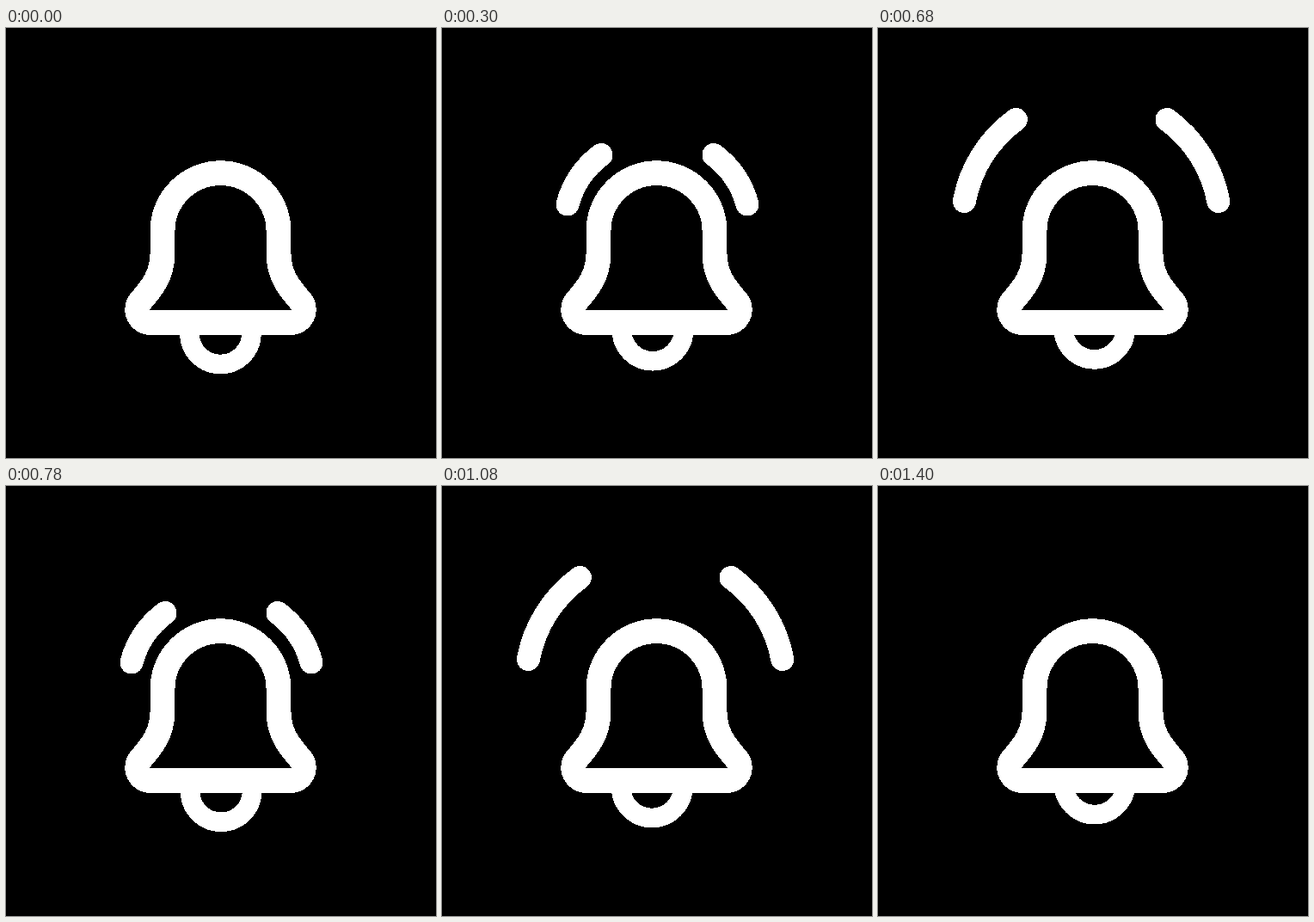
These frames come from a looping animation (500x500 px, 2.4 s). An HTML page:

```html
<!DOCTYPE html>
<html lang="en">
<head>
<meta charset="utf-8">
<title>Ringing bell</title>
<style>
  html, body { margin: 0; width: 100%; height: 100%; overflow: hidden; background: #000; }
  svg { display: block; width: 100vw; height: 100vh; }
  path { fill: none; stroke: #fff; shape-rendering: crispEdges; }
  #bell { stroke-width: 28.9; stroke-linejoin: round; }
  #clapper { stroke-width: 22.6; }
  .wave { stroke-width: 27; stroke-linecap: round; visibility: hidden; }
</style>
</head>
<body>
<svg viewBox="0 0 500 500">
  <path id="clapper" d="M213.4 355 A36 36 0 0 0 285.4 355"/>
  <path id="bell" d="M168 342.4 A15 15 0 0 1 156.5 317.5 C169 303 182 288 182 262 V236.2
    A67.5 67.5 0 0 1 317 236.2 V262 C317 288 330 303 342.5 317.5 A15 15 0 0 1 331 342.4 Z"/>
  <path class="wave" id="near" d="M146 205 A107 107 0 0 1 185 147.5 M316 147.5 A107 107 0 0 1 355 205"/>
  <path class="wave" id="far" d="M100.4 201.5 A151.4 151.4 0 0 1 160.4 106.5 M336 106.5 A151.4 151.4 0 0 1 395.8 201.5"/>
</svg>
<script>
  const LOOP = 2400, ACTIVE = 1400, STEP = 20, SWING = 400;
  // [start in ms, visible wave]
  const WAVES = [[0, ''], [180, 'near'], [480, 'far'], [780, 'near'], [1080, 'far'], [1380, '']];
  const get = id => document.getElementById(id);
  const clapper = get('clapper');
  const waves = [get('near'), get('far')];

  // Eased swing between -1 (right) and 1 (left), starting in the middle.
  function swing(t) {
    const u = t / SWING + 0.5, k = Math.floor(u), p = u - k;
    const s = 2 * p * p * (3 - 2 * p) - 1;
    return k % 2 ? -s : s;
  }

  function draw(ms) {
    const t = Math.min(ACTIVE, Math.floor(ms / STEP) * STEP);
    const s = swing(t);
    const x = -4.8 * s - 2.3 * s * s;
    const y = 0.4 * s - 8.5 * s * s;
    clapper.setAttribute('transform', `translate(${x} ${y})`);

    const shown = WAVES.filter(w => w[0] <= t).pop()[1];
    for (const w of waves) w.style.visibility = w.id === shown ? 'visible' : 'hidden';
  }

  const start = performance.now();
  function tick() {
    draw((performance.now() - start) % LOOP);
    requestAnimationFrame(tick);
  }
  tick();
</script>
</body>
</html>
```
